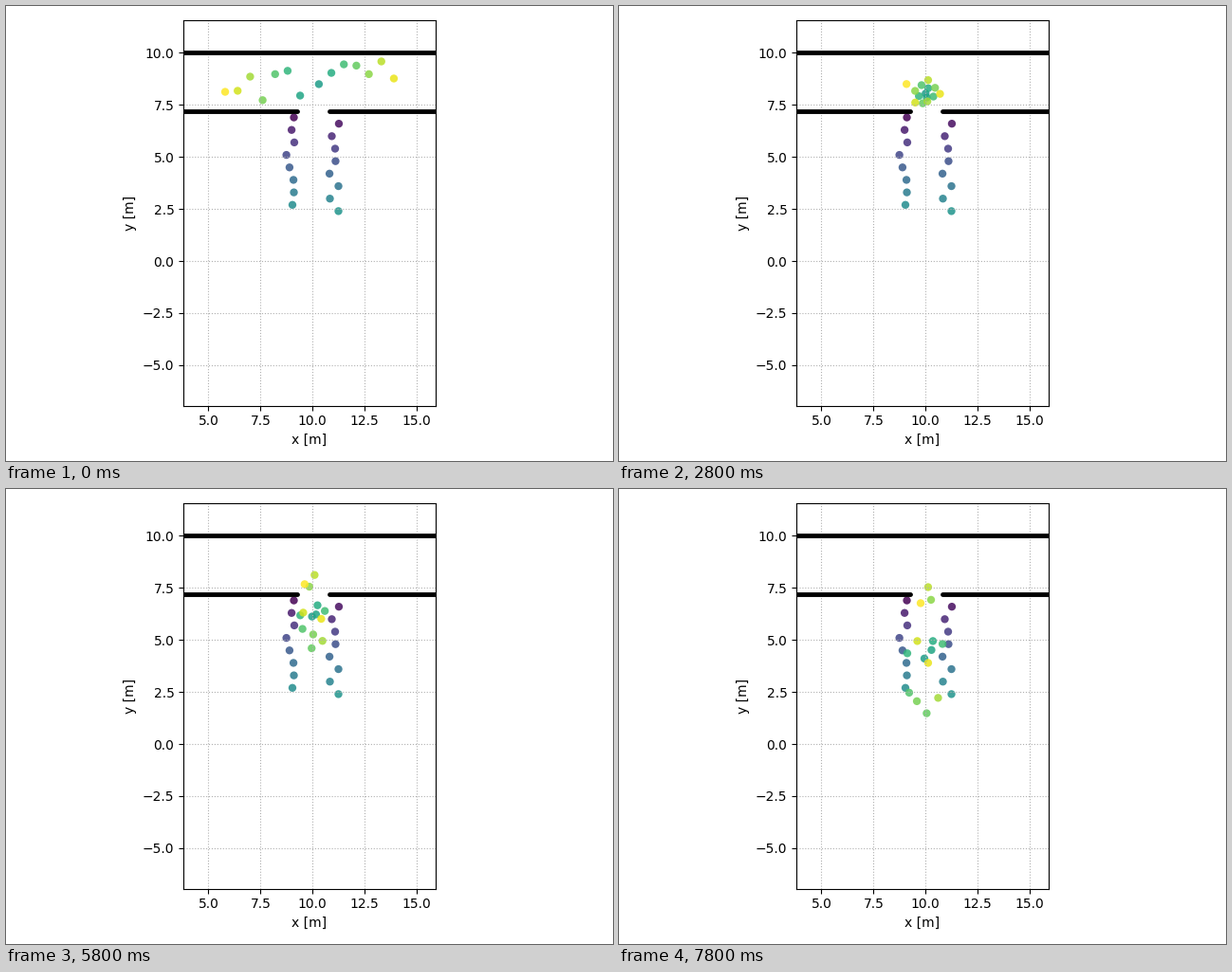
Animation of 640x480 px, one loop 8 s. Source, as a matplotlib script:

```python
import numpy as np
import matplotlib.pyplot as plt
from matplotlib.animation import FuncAnimation

W, H, DPI = 640, 480, 100
STEPS, STEP_MS = 40, 200
SPEED = 1.18 * STEP_MS / 1000    # metres per step
GOLDEN = np.pi * (3 - np.sqrt(5))

# two standing columns below the gate, alternating left and right
n = np.arange(16)
jitter = np.array([.10, .26, -.01, -.08, .12, .08, -.26, .10,
                   -.11, -.19, .08, .24, .10, -.17, .03, .24])
standing = np.column_stack([9 + 2 * (n % 2) + jitter, 6.9 - 0.3 * n])

# the crowd waits in a row that spreads from the gate, right and left in turn
k = np.arange(14)
side = np.where(k % 2, -1, 1)
row_x = np.where(k % 2, 9.4, 10.3) + side * 0.6 * (k // 2)
row_y = [8.50, 7.95, 9.04, 9.14, 9.45, 8.98, 9.39,
         7.73, 8.98, 8.86, 9.59, 8.18, 8.77, 8.13]
row = np.column_stack([row_x, row_y])

# it jams as a spiral disc above the gate, the nearest walkers innermost
turn = np.radians(148.5) + GOLDEN * k
radius = 0.2 * np.sqrt(k)
jam = np.column_stack([10 + radius * np.cos(turn), 8.05 + radius * np.sin(turn)])

# where each walker has got to at the end of the loop
passed = np.array([(9.94, 4.11), (10.28, 4.52), (10.35, 4.95), (9.12, 4.36),
                   (10.81, 4.81), (9.21, 2.47), (10.05, 1.48), (9.58, 2.06),
                   (10.26, 6.93), (10.60, 2.22), (10.12, 7.54), (9.60, 4.95),
                   (10.12, 3.90), (9.76, 6.77)])


def positions(i):
    """Walk to the jam at an even speed, then pass the gate in surges."""
    way = np.hypot(*(jam - row).T)
    near = np.minimum(SPEED * i / way, 1)[:, None]
    surge = np.interp(i, [18, 25, 30, 32, 39], [0, 0.24, 0.55, 0.91, 1])
    crowd = row + near * (jam - row) + surge * (passed - jam)
    return np.vstack([standing, crowd])


fig, ax = plt.subplots(figsize=(W / DPI, H / DPI), dpi=DPI)
for x0, x1, y in [(3, 17, 10), (3, 9.27, 7.2), (10.8, 17, 7.2)]:
    ax.plot([x0, x1], [y, y], "k", lw=3.5, solid_capstyle="round")

start = positions(0)
dots = ax.scatter(start[:, 0], start[:, 1], c=np.arange(len(start)),
                  cmap="viridis", alpha=0.85, linewidths=0)

ax.set_aspect("equal")
ax.set_xlim(3.8, 15.9)
ax.set_ylim(-6.95, 11.57)
ax.set_xticks(np.arange(5, 15.1, 2.5))
ax.set_yticks(np.arange(-5, 10.1, 2.5))
ax.set_xlabel("x [m]")
ax.set_ylabel("y [m]")
ax.grid(linestyle=":")
fig.tight_layout()


def update(i):
    dots.set_offsets(positions(i))
    return (dots,)


anim = FuncAnimation(fig, update, frames=STEPS, interval=STEP_MS,
                     repeat=True, repeat_delay=0)
plt.show()
```
